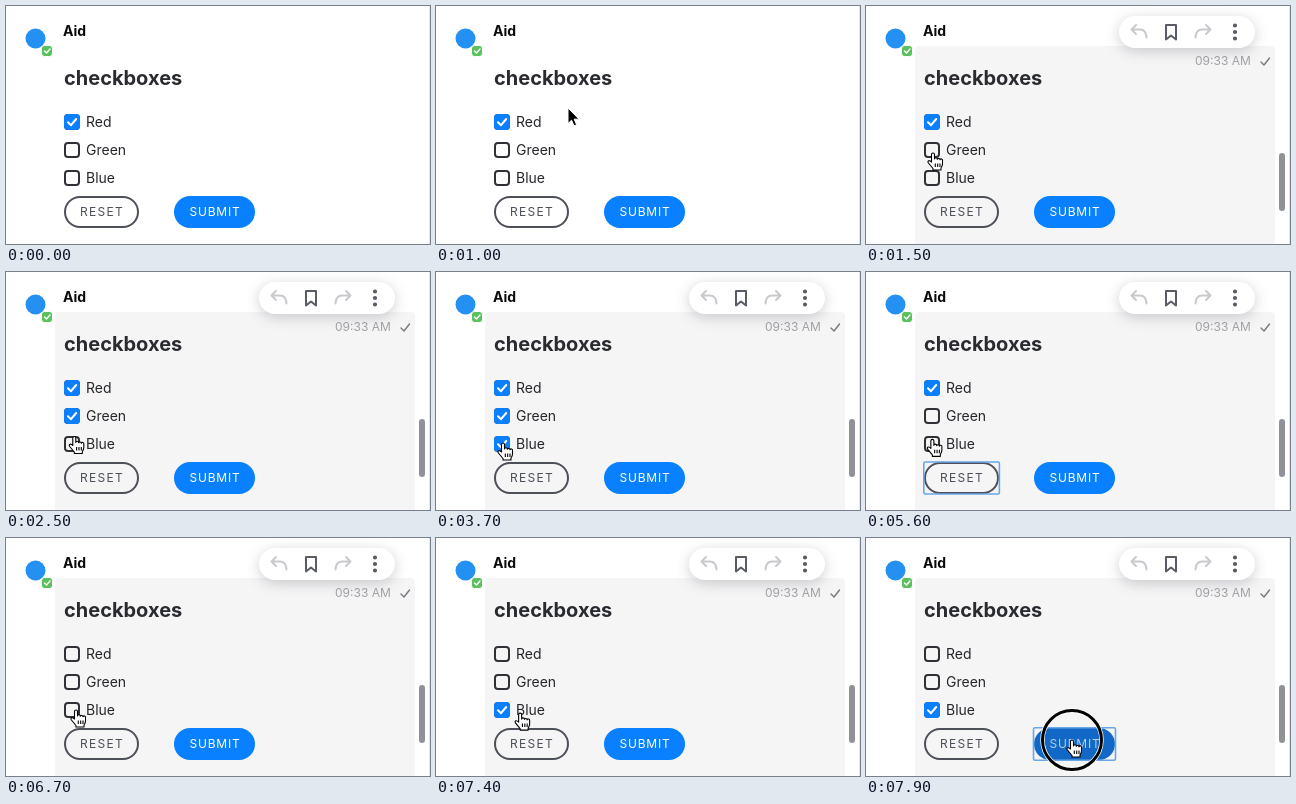
An HTML page that plays this animation: 424 px wide and 238 px high, repeating every 8000 ms.

```html
<!DOCTYPE html>
<html lang="en">
<head>
<meta charset="utf-8">
<title>Checkbox form</title>
<style>
  html, body { margin: 0; width: 100%; height: 100%; overflow: hidden; background: #fff; }
  svg { display: block; width: 424px; height: 238px; font-family: Inter, sans-serif; }
  .toolbar { filter: drop-shadow(0 3px 7px rgba(30, 35, 60, .22)); }
  .icon { fill: none; stroke-width: 2; stroke-linecap: round; stroke-linejoin: round; }
  .label { font-size: 14px; fill: #25262b; }
  .button { font-size: 12px; text-anchor: middle; }
  .focus { fill: none; stroke: #68a8e8; stroke-width: 1.6; }
</style>
</head>
<body>
<svg viewBox="0 0 424 238">
  <path d="M423.5 0V238" stroke="#e6e6e8"/>
  <g id="hover">
    <path d="M49 238V44q0-4 4-4H405q4 0 4 4V238z" fill="#f5f5f5"/>
    <text x="329" y="59" font-size="12" fill="#a2a3a8">09:33 AM</text>
    <path d="M395 56l3 3 5.500-7" class="icon" stroke="#777980" style="stroke-width:1.4"/>
    <rect class="toolbar" x="253" y="10" width="136" height="32" rx="16" fill="#fff"/>
    <g class="icon" stroke="#c9cace">
      <path id="arrow-back" d="M270 19l-4.500 4.500 4.500 4.500M266 23.500H274q6 0 6.500 8"/>
      <use href="#arrow-back" transform="matrix(-1 0 0 1 610 0)"/>
    </g>
    <path class="icon" d="M300 19H310V33.500L305 29.500 300 33.500z" stroke="#5a5c65"/>
    <path class="icon" d="M369 19.500v0M369 26v0M369 32.500v0" stroke="#5a5c65" style="stroke-width:4.200"/>
    <rect x="413" y="147" width="6" height="58" rx="3" fill="#909198"/>
  </g>

  <circle cx="29.500" cy="32.500" r="10" fill="#2490f2"/>
  <rect x="35.500" y="39.500" width="11" height="11" rx="3" fill="#5cc05f" stroke="#fff"/>
  <path class="icon" d="M38.500 45l2 2 3.500-4" stroke="#fff" style="stroke-width:1.4"/>
  <text x="57" y="30" font-size="14" font-weight="700" fill="#0b0b0d">Aid</text>
  <text x="58" y="79" font-size="20" font-weight="700" fill="#2a2b30">checkboxes</text>

  <g id="options"></g>

  <rect id="reset" x="59" y="191" width="73" height="30" rx="15" stroke="#4d4f59" stroke-width="2"/>
  <text class="button" x="96" y="210" letter-spacing="1.3" fill="#4d4f59">RESET</text>
  <rect id="submit" x="168" y="190" width="81" height="32" rx="16"/>
  <text class="button" id="submit-text" x="209" y="210" letter-spacing=".8">SUBMIT</text>
  <rect class="focus" id="reset-focus" x="57.800" y="190" width="75.600" height="32" rx="1.500"/>
  <rect class="focus" id="submit-focus" x="167.500" y="189.800" width="82" height="32.400" rx="1.500"/>

  <g id="cursor">
    <g id="ring" fill="none">
      <circle r="29.500" stroke="#fff" stroke-width="4.500"/>
      <circle r="29.500" stroke="#000" stroke-width="3"/>
    </g>
    <path id="arrow" d="M0 0V15.500L3.600 12.200 6 17.800 8.600 16.700 6.200 11.200H11z" fill="#000" stroke="#fff"/>
    <path id="hand" d="M-1.500 9V1.500a1.500 1.500 0 0 1 3 0V6a1.400 1.400 0 0 1 2.800.3a1.400 1.400 0 0 1 2.700.5a1.300 1.300 0 0 1 2.500.7V11q0 2-1.500 4v2H0v-1.500L-4.600 10q-1-1.800.3-2.300 1.200-.4 2.800 1.300zM2.300 10.500v3.500M4.700 10.500v3.500M7 10.500v3.500"
      fill="#fff" stroke="#000" stroke-width="1.100" stroke-linejoin="round"/>
  </g>
</svg>
<script>
const LOOP = 8000, STEP = 100, CLICK = 200;
const $ = id => document.getElementById(id);
const show = (id, on) => $(id).setAttribute('visibility', on ? 'inherit' : 'hidden');
const within = (t, from, to) => t >= from && t < to;

// Pointer stops: time, x, y
const path = [
  [500, 210, 113], [1000, 132, 102], [1100, 132, 102], [1500, 67, 147],
  [2200, 67, 147], [2700, 69, 174], [3200, 69, 174], [3300, 67, 171],
  [3700, 67, 171], [4100, 95, 196], [4700, 95, 196], [5200, 66, 171],
  [5500, 66, 171], [6100, 71, 122], [6500, 71, 122], [6700, 70, 172],
  [7300, 70, 172], [7800, 206, 202], [8000, 206, 202]
];
const clicks = [2000, 2900, 4400, 6300, 7100, 7900];

// Spans during which each option is ticked
const options = [
  { name: 'Red', y: 108, ticked: [[0, 6500]] },
  { name: 'Green', y: 136, ticked: [[2200, 4600]] },
  { name: 'Blue', y: 164, ticked: [[3100, 4600], [7300, LOOP]] }
];

$('options').innerHTML = options.map(({ name, y }) => `
  <g transform="translate(58 ${y})">
    <rect x="1" y="1" width="14" height="14" rx="3" fill="none" stroke="#303137" stroke-width="2"/>
    <g id="${name}">
      <rect width="16" height="16" rx="4" fill="#0a7fff"/>
      <path class="icon" d="M4 8.300L7 11.200 12.200 5" stroke="#fff"/>
    </g>
    <text class="label" x="22" y="13">${name}</text>
  </g>`).join('');

function pointerAt(t) {
  const next = path.findIndex(stop => stop[0] > t);
  if (next < 1) return path[0].slice(1);
  const [t0, x0, y0] = path[next - 1], [t1, x1, y1] = path[next];
  const k = (t - t0) / (t1 - t0), ease = k * k * (3 - 2 * k);
  return [x0 + (x1 - x0) * ease, y0 + (y1 - y0) * ease];
}

function render(now) {
  const t = Math.floor(now % LOOP / STEP) * STEP;
  const [x, y] = pointerAt(t);
  const onButton = y >= 190 && y < 222;
  const onReset = onButton && x >= 58 && x < 133;
  const onSubmit = onButton && x >= 168 && x < 249;
  const onOption = x >= 58 && x < 110 && options.some(o => within(y, o.y, o.y + 16));
  const pointing = onReset || onSubmit || onOption;

  show('hover', t >= 1200);
  for (const o of options) show(o.name, o.ticked.some(([from, to]) => within(t, from, to)));

  $('reset').setAttribute('fill', onReset ? '#e6e7ea' : 'transparent');
  $('submit').setAttribute('fill', onSubmit ? '#1168c6' : '#0880ff');
  $('submit-text').setAttribute('fill', onSubmit ? '#b4cfee' : '#fff');
  show('reset-focus', within(t, 4400, 6300));
  show('submit-focus', t >= 7900);

  show('cursor', t >= 500);
  $('cursor').setAttribute('transform', `translate(${x} ${y})`);
  show('arrow', !pointing);
  show('hand', pointing);
  show('ring', clicks.some(c => within(t, c, c + CLICK)));
}

const start = performance.now();
function tick() {
  render(performance.now() - start);
  requestAnimationFrame(tick);
}
tick();
</script>
</body>
</html>
```
